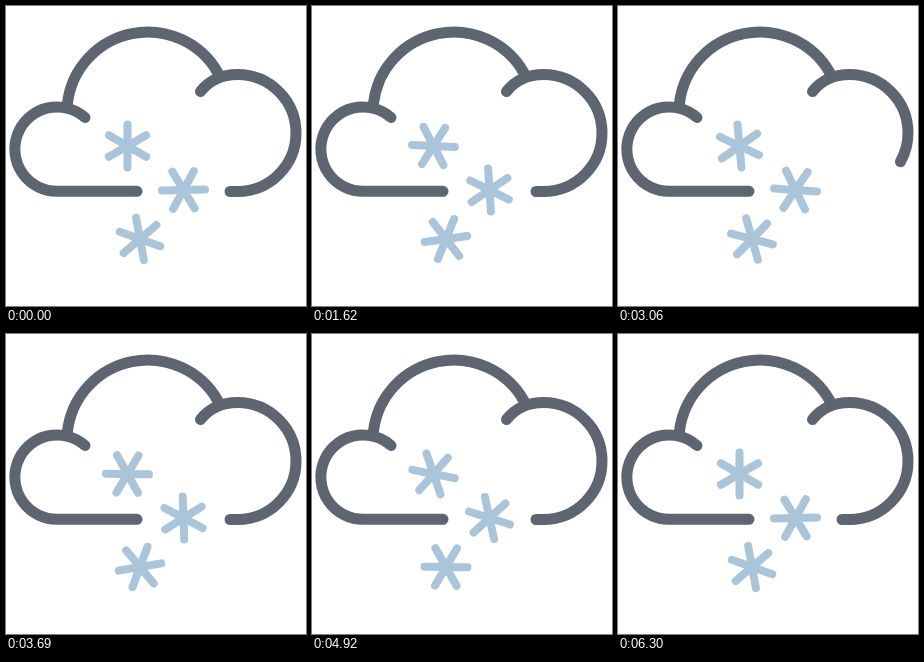
Recreate the animation shown at these times as an HTML page. Size 300x300 px, loop 6330 ms.

```html
<!DOCTYPE html>
<html lang="en">
<head>
<meta charset="utf-8">
<title>Snow cloud</title>
<style>
  html, body { margin: 0; width: 100%; height: 100%; overflow: hidden; background: #fff; }
  svg { display: block; width: 100%; height: 100%; }
  path { fill: none; stroke-linecap: round; }
  .cloud { stroke: #5d6571; stroke-width: 11; }
  .flakes { stroke: #aac4d9; stroke-width: 8; }
</style>
</head>
<body>
<svg viewBox="0 0 300 300">
  <g class="cloud">
    <path d="M131 185.3H51.5A42.2 42.2 0 1 1 79 111.5"/>
    <path d="M61.5 97A80.8 80.8 0 0 1 212 67"/>
    <path d="M194.5 85.5Q208 68.5 231.5 68.5A58.5 58.5 0 0 1 231.5 185.5H224"/>
  </g>
  <g class="flakes"></g>
</svg>
<script>
const LOOP = 6330, STEP = 30, TURN = 6300;
const GAP = 760, ERASE_START = 1600, DRAW_END = 3495;

// The three strokes are treated as one long line.
let total = 0;
const strokes = [...document.querySelectorAll('.cloud path')].map(el => {
  const length = el.getTotalLength(), start = total;
  total += length;
  return { el, start, length };
});

const flakes = [
  { x: 121.5, y: 140, angle: 0, spin: 1 },
  { x: 177.5, y: 184, angle: 28.8, spin: -1 },
  { x: 134, y: 233, angle: -10.5, spin: 1 }
];
const arm = 21.5, dx = arm * Math.sqrt(3) / 2, dy = arm / 2;
for (const flake of flakes) {
  flake.el = document.createElementNS('http://www.w3.org/2000/svg', 'path');
  flake.el.setAttribute('d',
    `M0 ${-arm}V${arm}M${-dx} ${-dy}L${dx} ${dy}M${-dx} ${dy}L${dx} ${-dy}`);
  document.querySelector('.flakes').append(flake.el);
}

const clamp = (v, lo, hi) => Math.min(hi, Math.max(lo, v));
const ease = u => u < .5 ? 4 * u ** 3 : 1 - 4 * (1 - u) ** 3;

function showRange(from, to) {
  for (const { el, start, length } of strokes) {
    const a = clamp(from - start, 0, length);
    const b = clamp(to - start, 0, length);
    el.style.visibility = b > a ? 'visible' : 'hidden';
    const whole = a === 0 && b === length;
    el.style.strokeDasharray = whole ? 'none' : `${b - a} 999`;
    el.style.strokeDashoffset = -a;
  }
}

function draw(t) {
  const turn = 360 * t / TURN;
  for (const { el, x, y, angle, spin } of flakes) {
    el.setAttribute('transform', `translate(${x} ${y}) rotate(${angle + spin * turn})`);
  }
  // A gap longer than the line sweeps through it: erase, then redraw.
  const u = clamp((t - ERASE_START) / (DRAW_END - ERASE_START), 0, 1);
  const head = ease(u) * (total + GAP);
  if (head < total) showRange(head, total);
  else showRange(0, head - GAP);
}

const begin = performance.now();
function tick() {
  const t = (performance.now() - begin) % LOOP;
  draw(Math.floor(t / STEP) * STEP);
  requestAnimationFrame(tick);
}
tick();
</script>
</body>
</html>
```
